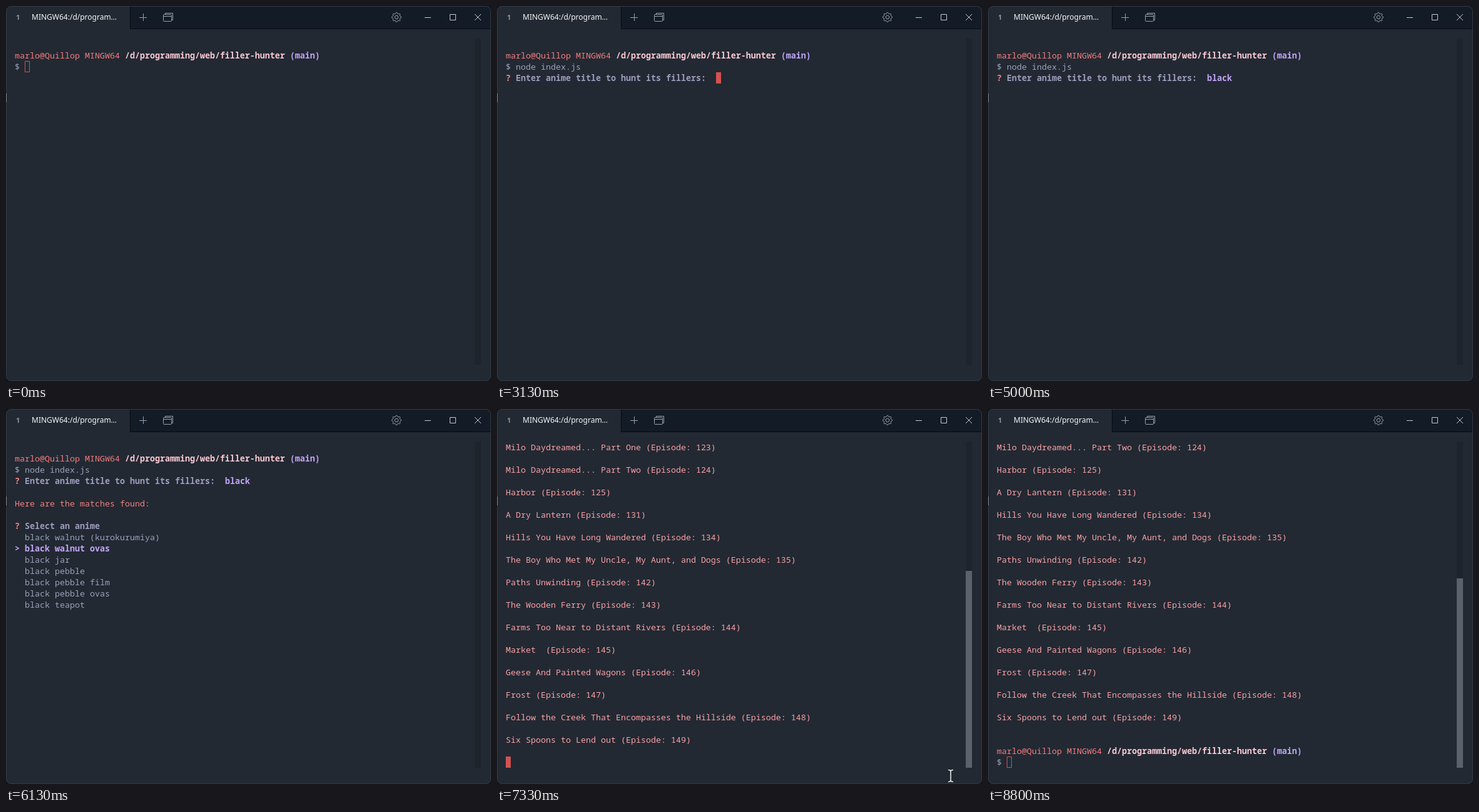
Animation, 775 px wide and 600 px high, one loop 8940 ms. Source, as an HTML page:

```html
<!DOCTYPE html>
<html lang="en">
<head>
<meta charset="utf-8">
<title>Terminal</title>
<style>
  html, body { margin: 0; width: 100%; height: 100%; overflow: hidden; background: #10161e; }
  #win { position: absolute; left: 0; top: 0; width: 775px; height: 600px; overflow: hidden; border-radius: 8px; background: #222933; }
  #win > * { position: absolute; }
  svg { left: 0; top: 0; }
  #screen { left: 14px; top: 52px; margin: 0; font: 500 13.3333px/18px "Noto Sans Mono", "DejaVu Sans Mono", monospace; color: #9aa2ba; font-variant-ligatures: none; }
  b { font-weight: 600; }
  .user { color: #f47c7c; }
  .path { color: #f9c8d2; }
  .branch, .pick { color: #c2a5f7; }
  .ask { color: #9f9bbd; }
  .note { color: #f47f7f; }
  .item { color: #fba0a3; }
  #cursor { width: 8px; height: 18px; box-sizing: border-box; background: #d2524f; }
  #cursor.hollow { background: none; border: 1px solid #d2524f; }
  #track { left: 749px; top: 52px; width: 10px; height: 522px; background: #1d242c; }
  #thumb { position: absolute; bottom: 0; width: 10px; background: #59616a; }
</style>
</head>
<body>
<div id="win">
  <svg width="775" height="600" fill="none" stroke="#98a1ab">
    <path d="M198 0H775V37H198Z" fill="#131b26" stroke="none"/>
    <path d="M198.5 0V36.5H775" stroke="#070b10"/>
    <g font-family="'Noto Sans', 'Open Sans', sans-serif" font-weight="600" font-size="12" stroke="none">
      <text x="16" y="22" font-size="11" fill="#8d959e">1</text>
      <text x="41" y="22" font-weight="500" fill="#f7f8f9">MINGW64:/d/program…</text>
    </g>
    <path d="M213 18.5H225M219.5 12V24"/>
    <rect x="251.5" y="13.5" width="13" height="11" rx="1"/>
    <path d="M254.5 13.5V11.5H266.5V22.5H264.5M251.5 16.5H264.5"/>
    <path id="gear" stroke-linejoin="round"/>
    <circle cx="624" cy="18" r="2.8"/>
    <path d="M669 18.5H679M709.5 13.5H718.5V22.5H709.5ZM749 13L759 23M759 13L749 23" stroke="#c5cad0"/>
    <rect x=".5" y=".5" width="774" height="599" rx="8" stroke="#343b45"/>
    <path d="M.5 140V154" stroke="#858b86"/>
  </svg>
  <pre id="screen"></pre>
  <div id="cursor"></div>
  <div id="track"><div id="thumb"></div></div>
  <svg id="pointer" width="775" height="600" fill="none" stroke="#e8e8e8" stroke-width="1.6">
    <path d="M721 577.5Q725 577.5 725 580V594Q725 596.5 721 596.5M729 577.5Q725 577.5 725 580M725 594Q725 596.5 729 596.5"/>
  </svg>
</div>
<script>
const LOOP = 8940;
const $ = id => document.getElementById(id);
const span = (cls, text) => `<span class="${cls}">${text}</span>`;
const bold = (cls, text) => `<b class="${cls}">${text}</b>`;

const prompt = span('user', 'marlo@Quillop MINGW64') + ' ' +
  bold('path', '/d/programming/web/filler-hunter') + ' ' + bold('branch', '(main)');
const ask = text => bold('note', '?') + ' ' + bold('ask', text);
const question = ask('Enter anime title to hunt its fillers:') + '  ';
const started = ['', prompt, '$ node index.js'];
const answered = [...started, question + bold('pick', 'black')];
const found = [...answered, '', span('note', 'Here are the matches found:'), ''];

const titles = ['walnut (kurokurumiya)', 'walnut ovas', 'jar', 'pebble', 'pebble film', 'pebble ovas', 'teapot']
  .map(name => 'black ' + name);
const menu = (chosen, hint = '') => [...found, ask('Select an anime') + hint,
  ...titles.map((name, i) => i === chosen ? bold('pick', '&gt; ' + name) : '  ' + name)];

const episodes = [
  ['Milo Daydreamed... Part One', 123], ['Milo Daydreamed... Part Two', 124], ['Harbor', 125],
  ['A Dry Lantern', 131], ['Hills You Have Long Wandered', 134],
  ['The Boy Who Met My Uncle, My Aunt, and Dogs', 135], ['Paths Unwinding', 142],
  ['The Wooden Ferry', 143], ['Farms Too Near to Distant Rivers', 144], ['Market ', 145],
  ['Geese And Painted Wagons', 146], ['Frost', 147],
  ['Follow the Creek That Encompasses the Hillside', 148], ['Six Spoons to Lend out', 149]
].flatMap(([name, n]) => [span('item', `${name} (Episode: ${n})`), '']);
const finished = [...episodes.slice(2), '', prompt, '$'];

// Each scene: start time, rows, cursor [column, row, hollow], scroll thumb height
const scenes = [
  [0, ['', prompt, '$'], [2, 2, true]],
  [930, ['', prompt, '$'], [2, 2]],
  ...[[1470, 'n'], [1530, 'no'], [1600, 'node'], [1670, 'node '], [1800, 'node in'], [1930, 'node index.js ']]
    .map(([at, typed]) => [at, ['', prompt, '$ ' + typed], [2 + typed.length, 2]]),
  [2330, started, [0, 3]],
  [3070, [...started, question]],
  [3130, [...started, question], [42, 3]],
  ...[3800, 3870, 3930, 4000, 4070]
    .map((at, i) => [at, [...started, question + 'black'.slice(0, i + 1)], [43 + i, 3]]),
  [4400, answered, [0, 4]],
  [5000, answered],
  [5600, menu(0, ' (Use arrow keys)')],
  [6130, menu(1)],
  [6330, menu(2)],
  [6600, menu(3)],
  [6870, [...found, ask('Select an anime') + ' ' + span('pick', titles[3])], [0, 8]],
  [7330, episodes, [0, 28], 315],
  [7600, finished, [2, 28], 303],
  [8200, finished, null, 303],
  [8800, finished, [2, 28, true], 303]
];

$('gear').setAttribute('d', 'M' + Array.from({ length: 32 }, (_, i) => {
  const a = (i - 0.5) * Math.PI / 16, r = i % 4 < 2 ? 7.6 : 5.9;
  return (624 + r * Math.cos(a)).toFixed(2) + ' ' + (18 + r * Math.sin(a)).toFixed(2);
}).join('L') + 'Z');

let shown;
function draw() {
  const t = performance.now() % LOOP;
  const scene = scenes.findLast(s => s[0] <= t);
  if (scene !== shown) {
    shown = scene;
    const [, rows, cursor, thumb = 0] = scene;
    $('screen').innerHTML = rows.join('\n');
    $('cursor').hidden = !cursor;
    if (cursor) {
      const [col, row, hollow] = cursor;
      $('cursor').style.left = 14 + col * 8 + 'px';
      $('cursor').style.top = 52 + row * 18 + 'px';
      $('cursor').className = hollow ? 'hollow' : '';
    }
    $('thumb').style.height = thumb + 'px';
  }
  $('pointer').style.display = t >= 7330 && t < 7400 ? '' : 'none';
  requestAnimationFrame(draw);
}
draw();
</script>
</body>
</html>
```
